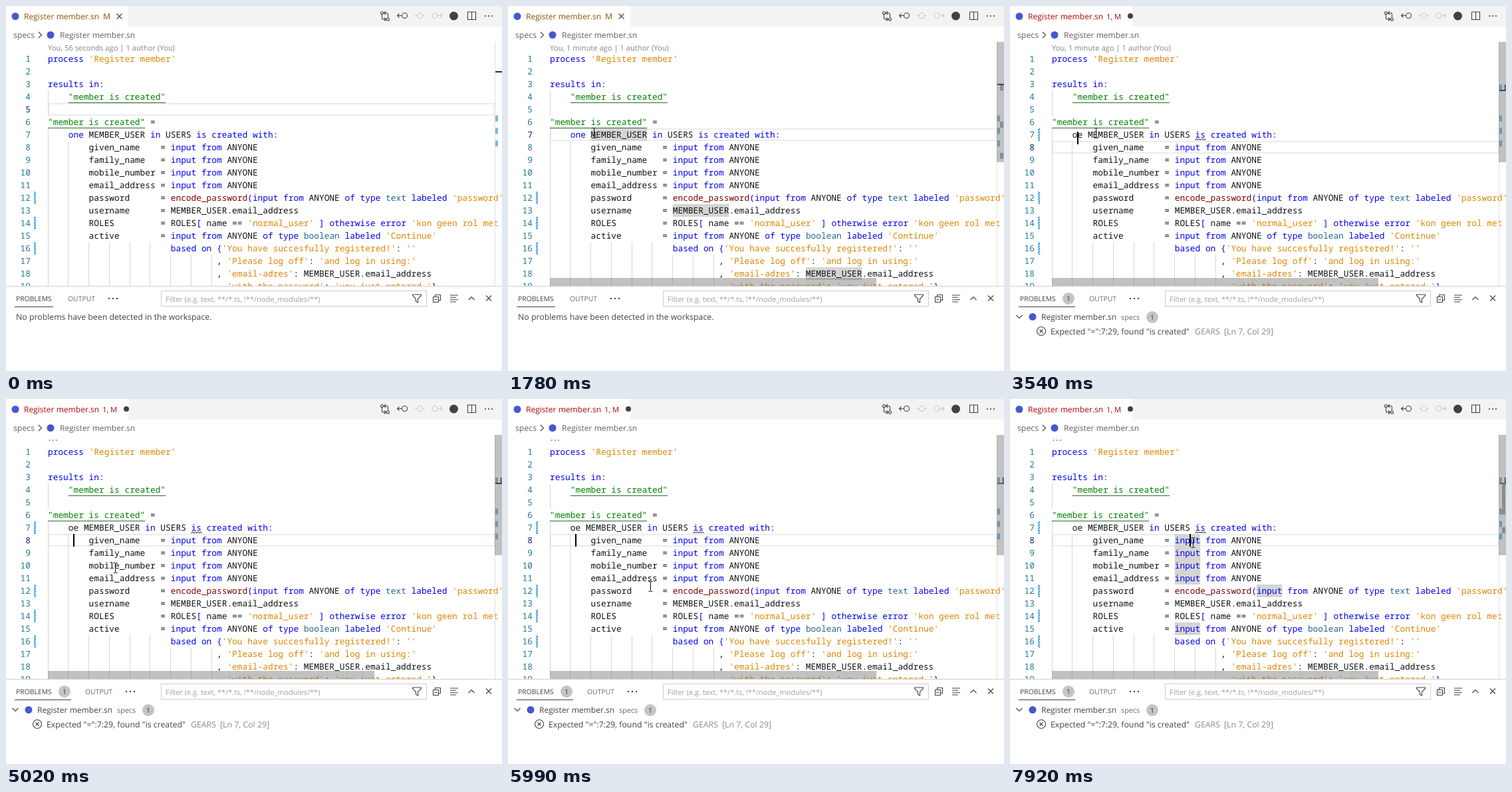
Write an HTML page that moves like this. It is 746x549 px and loops after 7.99 s.

```html
<!DOCTYPE html>
<html lang="en">
<head>
<meta charset="utf-8">
<title>Editor with live problem reports</title>
<style>
html, body { margin: 0; width: 100%; height: 100%; overflow: hidden; background: #fff; }
svg { display: block; width: 100%; height: 100%; }
text { font: 12.3px "Open Sans", "Noto Sans", sans-serif; fill: #424242; white-space: pre; text-rendering: geometricPrecision; }
.file { font-size: 12.05px; }
.tab { font-size: 10.4px; }
.lens { font-size: 11.2px; fill: #858585; }
.dim { fill: #8a8a8a; }
.git { fill: #895503; }
.bad { fill: #ad0707; }
.badge { font-size: 10.4px; text-anchor: middle; fill: #333; }
.code text { font: 500 12.83px "Noto Sans Mono", "DejaVu Sans Mono", monospace; fill: #111; }
.code .num { text-anchor: end; fill: #237893; }
.code .num.active { fill: #0b216f; }
.kw { fill: #0000f0; }
.str { fill: #dd8500; }
.ref { fill: #008000; }
.fn { fill: #800000; }
.type { fill: #24688a; }
.icon { fill: none; stroke: #424242; stroke-width: 1.1; }
.dot { fill: #424242; }
.logo { fill: #4558cf; }
.hit { fill: #d5d5d5; }
.slider { fill: #646464; fill-opacity: .4; }
</style>
</head>
<body>
<svg viewBox="0 0 746 549" xmlns="http://www.w3.org/2000/svg">
  <defs>
    <pattern id="hatch" width="3" height="4" patternUnits="userSpaceOnUse">
      <rect width="3" height="4" fill="#d9effa"/>
      <path d="M-1 4.5L4 -.5M-1 8.5L4 3.5M-1 .5L1 -1.5" stroke="#2090d3" stroke-width="1.5"/>
    </pattern>
  </defs>
  <rect width="746" height="549" fill="#fff"/>

  <g id="editor" class="code">
    <g id="back"></g>
    <g id="lines"></g>
    <g id="front"></g>
  </g>
  <g data-on="0 1780"><text class="lens" x="63" y="67">You, 56 seconds ago | 1 author (You)</text></g>
  <g data-on="1780 3570"><text class="lens" x="63" y="67">You, 1 minute ago | 1 author (You)</text></g>
  <g data-on="3570 7990" fill="#858585"><circle cx="65.5" cy="62" r="1"/><circle cx="70.7" cy="62" r="1"/><circle cx="76" cy="62" r="1"/></g>

  <path d="M735.5 54V421" stroke="#e0e0e0"/>
  <g id="ruler"></g>
  <g id="sliders" class="slider">
    <rect x="735" y="54" width="11" height="181"/>
    <rect x="63" y="409" width="491" height="12"/>
  </g>
  <rect id="caret" width="2" height="19"/>

  <!-- tab bar and breadcrumb -->
  <rect x="184" width="562" height="31" fill="#f3f3f3"/>
  <circle class="logo" cx="14" cy="15.5" r="5.5"/>
  <g data-on="0 3250"><text class="file git" x="27" y="20">Register member.sn</text><text class="git" x="146" y="19.5">M</text></g>
  <g data-on="3250 7990"><text class="file bad" x="27" y="20">Register member.sn</text><text class="bad" x="145" y="19.5" style="font-size:11.2px">1, M</text></g>
  <path data-on="0 3060" class="icon" d="M166.500 11.500l8 8m0-8l-8 8"/>
  <circle data-on="3060 7990" class="dot" cx="181" cy="15" r="4"/>
  <text x="11" y="48" style="fill:#616161">specs</text>
  <path class="icon" d="M49 39l4.500 4.500l-4.500 4.500"/>
  <circle class="logo" cx="67" cy="43.500" r="5.500"/>
  <text class="file" x="81" y="48" style="fill:#616161">Register member.sn</text>
  <g class="icon">
    <circle cx="565.500" cy="10.500" r="2"/><circle cx="574.500" cy="20" r="2"/>
    <path d="M565.500 12.500V18q0 2 2 2h4M569 17.500l2.500 2.500l-2.500 2.500M574.500 18v-5.500q0-2-2-2h-4M571 8l-2.500 2.500l2.500 2.500"/>
    <circle cx="599.500" cy="14.500" r="4"/><path d="M595.500 14.500h-7m3-3l-3 3l3 3"/>
    <g stroke="#c8c8c8"><circle cx="622.500" cy="14.500" r="4"/><path d="M615 14.500h3.500m8 0h3.500"/>
      <circle cx="645" cy="14.500" r="4"/><path d="M649 14.500h7m-3-3l3 3l-3 3"/></g>
    <path d="M694.500 9h12v11.500h-12zM700.500 9v11.500"/>
  </g>
  <circle class="dot" cx="673.500" cy="15" r="6.500"/>
  <g class="dot"><circle cx="721" cy="15" r="1.100"/><circle cx="726" cy="15" r="1.100"/><circle cx="731" cy="15" r="1.100"/></g>

  <!-- problems panel -->
  <rect y="421" width="746" height="128" fill="#fff"/>
  <path d="M0 421.500H746" stroke="#cfcfcf"/>
  <text class="tab" x="15" y="444">PROBLEMS</text>
  <g data-on="0 3250">
    <path d="M13 452.500H71" stroke="#424242"/>
    <text class="tab" x="93" y="444" style="fill:#6b6b6b">OUTPUT</text>
    <g class="dot"><circle cx="155" cy="440" r="1.200"/><circle cx="161" cy="440" r="1.200"/><circle cx="167" cy="440" r="1.200"/></g>
    <text x="15" y="472">No problems have been detected in the workspace.</text>
  </g>
  <g data-on="3250 7990">
    <path d="M13 452.500H98" stroke="#424242"/>
    <text class="tab" x="119" y="444" style="fill:#6b6b6b">OUTPUT</text>
    <g class="dot"><circle cx="181" cy="440" r="1.200"/><circle cx="187" cy="440" r="1.200"/><circle cx="193" cy="440" r="1.200"/></g>
    <g fill="#c4c4c4"><circle cx="88" cy="440" r="9"/><circle cx="214" cy="468" r="9"/></g>
    <text class="badge" x="88" y="444">1</text><text class="badge" x="214" y="472">1</text>
    <path class="icon" d="M9.500 465l4.500 4.500l4.500-4.500"/>
    <circle class="logo" cx="34" cy="467.500" r="5.500"/>
    <text class="file" x="47" y="472">Register member.sn</text>
    <text x="167" y="472" style="font-size:10.8px;fill:#666">specs</text>
    <g class="icon" stroke="#b01011"><circle cx="47" cy="489" r="6.500"/><path d="M44.500 486.500l5 5m0-5l-5 5"/></g>
    <text x="61" y="494">Expected "=":7:29, found "is created"</text>
    <text class="dim" x="278" y="494">GEARS</text>
    <text class="dim" x="322" y="494">[Ln 7, Col 29]</text>
  </g>
  <rect x="233.500" y="428.500" width="399" height="23" fill="#fff" stroke="#cecece"/>
  <text x="240" y="444.500" style="font-size:11.03px;fill:#a0a0a0">Filter (e.g. text, **/*.ts, !**/node_modules/**)</text>
  <g class="icon">
    <path d="M611.500 434h13v1.500l-5 5v5.500l-3-1.500v-4l-5-5z"/>
    <path d="M645.500 437v-2.500h8v8h-2.500M642.500 437.500h8v8h-8zM644.500 441.500h4"/>
    <path d="M668 435h12M668 438.300h9M668 441.700h12M668 445h9"/>
    <path d="M695.500 442l4.500-4.500l4.500 4.500M722 435.500l8 8m0-8l-8 8"/>
  </g>

  <g id="mouse">
    <path id="beam" d="M-3 -7.500H-.5M.5 -7.500H3M0 -7V7M-3 7.500H-.5M.5 7.500H3" fill="none" stroke="#111"/>
    <path id="arrow" d="M0 0V16L3.700 12.500L6.200 18L8.600 17L6.200 11.500H11.300Z" fill="#fff" stroke="#111"/>
  </g>
</svg>
<script>
const LOOP = 7990, COL = 7.697, LEFT = 63, ROW = 19;
const $ = id => document.getElementById(id);
const colX = col => LEFT + col * COL;
const lineY = line => 70 + (line - 1) * ROW;
const rulerY = line => 118 + (line - 7) * 9.35;

function add(parent, tag, attrs, text = '') {
  const el = document.createElementNS('http://www.w3.org/2000/svg', tag);
  for (const key in attrs) el.setAttribute(key, attrs[key]);
  el.textContent = text;
  return parent.appendChild(el);
}

const field = (name, value) => ' '.repeat(8) + name.padEnd(14) + '= ' + value;
const source = [
  "process 'Register member'", '', 'results in:', '    "member is created"', '',
  '"member is created" =',
  '    one MEMBER_USER in USERS is created with:',
  ...['given_name', 'family_name', 'mobile_number', 'email_address'].map(name => field(name, 'input from ANYONE')),
  field('password', "encode_password(input from ANYONE of type text labeled 'password')"),
  field('username', 'MEMBER_USER.email_address'),
  field('ROLES', "ROLES[ name == 'normal_user' ] otherwise error 'kon geen rol met '"),
  field('active', "input from ANYONE of type boolean labeled 'Continue'"),
  ' '.repeat(24) + "based on {'You have succesfully registered!': ''",
  ...["'Please log off': 'and log in using:'", "'email-adres': MEMBER_USER.email_address",
    "'with the password': 'you just entered.'}"].map(pair => ' '.repeat(33) + ', ' + pair)
];

const TOKENS = [
  ['str', "'[^']*'"], ['ref', '"[^"]*"'], ['fn', '\\bencode_password\\b'], ['type', '\\b(?:text|boolean)\\b'],
  ['kw', '\\b(?:process|results|in|one|is|created|with|input|from|of|type|labeled|otherwise|error|based|on)\\b:?|[\\[\\]{}()]']
];
const lexer = new RegExp(TOKENS.map(([, pattern]) => `(${pattern})`).join('|'), 'g');

function drawCode(parent, code, line) {
  const row = add(parent, 'text', { x: LEFT, y: lineY(line) + 14, 'xml:space': 'preserve' });
  let end = 0;
  for (const match of code.matchAll(lexer)) {
    add(row, 'tspan', {}, code.slice(end, match.index));
    const kind = match.slice(1).findIndex(Boolean);
    add(row, 'tspan', { class: TOKENS[kind][0] }, match[0]);
    end = match.index + match[0].length;
  }
  add(row, 'tspan', {}, code.slice(end));
}

const timed = (parent, from, to) => add(parent, 'g', { 'data-on': `${from} ${to}` });

// Current line frame and its ruler mark
const numbers = [];
const spans = [[5, 0, 1190], [7, 1190, 3520], [8, 3520, LOOP]];
for (const [line, from, to] of spans) {
  const frame = timed($('back'), from, to);
  add(frame, 'rect', { x: LEFT + 1, y: lineY(line) + 1, width: 671, height: 17, fill: 'none', stroke: '#e8e8e8', 'stroke-width': 1.6 });
}

// Occurrence highlights: [line, column, length]
function highlight(from, to, hits) {
  const boxes = timed($('back'), from, to), marks = timed($('ruler'), from, to);
  for (const [line, col, length] of hits) {
    add(boxes, 'rect', { class: 'hit', x: colX(col), y: lineY(line), width: length * COL, height: ROW });
    add(marks, 'rect', { x: 740, y: rulerY(line), width: 5, height: 9, fill: '#a6a6a6' });
  }
}
highlight(1440, 2110, [[7, 8, 11], [13, 24, 11], [18, 50, 11]]);
highlight(2500, 3060, [[7, 4, 3]]);
highlight(7890, LOOP, [8, 9, 10, 11, 12, 15].map(line => [line, line === 12 ? 40 : 24, 5]));

// Indent guides: [column, first line, last line]
const guides = [[0, 4, 5], [0, 7, 19], [4, 8, 19], ...[8, 12, 16, 20].map(col => [col, 16, 19]), ...[24, 28, 32].map(col => [col, 17, 19])];
for (const [col, first, last] of guides)
  add($('back'), 'path', { d: `M${Math.floor(colX(col)) + .5} ${lineY(first)}V${lineY(last + 1)}`, stroke: '#d6d6d6' });

source.forEach((code, index) => {
  const line = index + 1;
  numbers[line] = add($('lines'), 'text', { class: 'num', x: 37, y: lineY(line) + 14 }, line);
  if (line === 7) {
    drawCode(timed($('lines'), 0, 3060), code, line);
    drawCode(timed($('lines'), 3060, LOOP), code.replace('one', 'oe'), line);
  } else drawCode($('lines'), code, line);
});

for (const [line, col] of [[4, 4], [6, 0]])
  add($('front'), 'path', { d: `M${colX(col)} ${lineY(line) + 18.5}h${19 * COL}`, stroke: '#2c6b2c' });

for (const line of [7, 12, 14, 16]) {
  const from = line === 7 ? 3060 : 0;
  add(timed($('front'), from, LOOP), 'rect', { x: 42, y: lineY(line), width: 3, height: ROW, fill: 'url(#hatch)' });
  add(timed($('ruler'), from, LOOP), 'rect', { x: 736, y: rulerY(line), width: 4, height: 9, fill: '#74b9e6' });
}

add(timed($('front'), 3250, LOOP), 'path', {
  d: `M${colX(28)} 202` + 'l2 -2.500l2 2.500'.repeat(4), fill: 'none', stroke: '#301010'
});
add(timed($('ruler'), 3250, LOOP), 'rect', { x: 743.5, y: 118, width: 2.5, height: 9, fill: '#6b6f92' });

const cursorMark = add($('ruler'), 'rect', { x: 736, width: 10, height: 2 });
const switched = [...document.querySelectorAll('[data-on]')].map(el => [el, ...el.dataset.on.split(' ').map(Number)]);

// Piecewise linear tracks: rows of [time, ...values]
function track(rows, t) {
  const next = rows.findIndex(row => row[0] > t);
  if (next < 0) return rows[rows.length - 1].slice(1);
  if (next === 0) return rows[0].slice(1);
  const a = rows[next - 1], b = rows[next], k = (t - a[0]) / (b[0] - a[0]);
  return a.slice(1).map((value, i) => value + (b[i + 1] - value) * k);
}
const pointer = [
  [250, 235, 438], [400, 216, 355], [790, 164, 184], [990, 129, 191], [4500, 129, 191],
  [5020, 164, 254], [5300, 188, 322], [5580, 214, 481], [5720, 220, 470], [5990, 214, 282],
  [6130, 222, 260], [6450, 282, 210], [6720, 322, 187], [6960, 322, 194], [7380, 275, 216]
];
const sliderFade = [[340, 0], [480, 1], [5420, 1], [5600, 0], [5800, 0], [5930, 1]];
const caretStops = [[1190, 8, 7], [2110, 7, 7], [2250, 6, 7], [3060, 5, 7], [3520, 5, 8], [7650, 27, 8]];

function drawCaret(t) {
  const at = caretStops.findLastIndex(stop => stop[0] <= t);
  const caret = $('caret');
  if (at < 0) return caret.setAttribute('visibility', 'hidden');
  const [start, col, line] = caretStops[at];
  const before = caretStops[at - 1];
  const glide = before && Math.abs(before[1] - col) < 5;
  const [c, l] = glide ? track([[start, before[1], before[2]], [start + 75, col, line]], t) : [col, line];
  caret.setAttribute('x', Math.round(colX(c) - .8));
  caret.setAttribute('y', Math.round(lineY(l)));
  caret.setAttribute('visibility', (t - start) % 1060 < 530 ? 'visible' : 'hidden');
}

function render(now) {
  const t = now % LOOP;
  for (const [el, from, to] of switched) el.style.display = t >= from && t < to ? '' : 'none';

  const active = spans.find(([, from, to]) => t >= from && t < to)[0];
  numbers.forEach((el, line) => el.classList.toggle('active', line === active));
  const faded = (t > 340 && t < 1190) || t > 5800;
  cursorMark.setAttribute('y', Math.round(rulerY(active) - 1.3));
  cursorMark.setAttribute('fill', faded ? '#80561f' : '#303030');

  $('sliders').setAttribute('opacity', track(sliderFade, t)[0]);
  drawCaret(t);

  const [x, y] = track(pointer, t).map(Math.round);
  const inPanel = y > 421;
  $('mouse').setAttribute('transform', `translate(${x + .5} ${y})`);
  $('mouse').style.display = t < 250 ? 'none' : '';
  $('beam').style.display = inPanel ? 'none' : '';
  $('arrow').style.display = inPanel ? '' : 'none';
}

const begin = performance.now();
function tick() {
  render(performance.now() - begin);
  requestAnimationFrame(tick);
}
tick();
</script>
</body>
</html>
```
